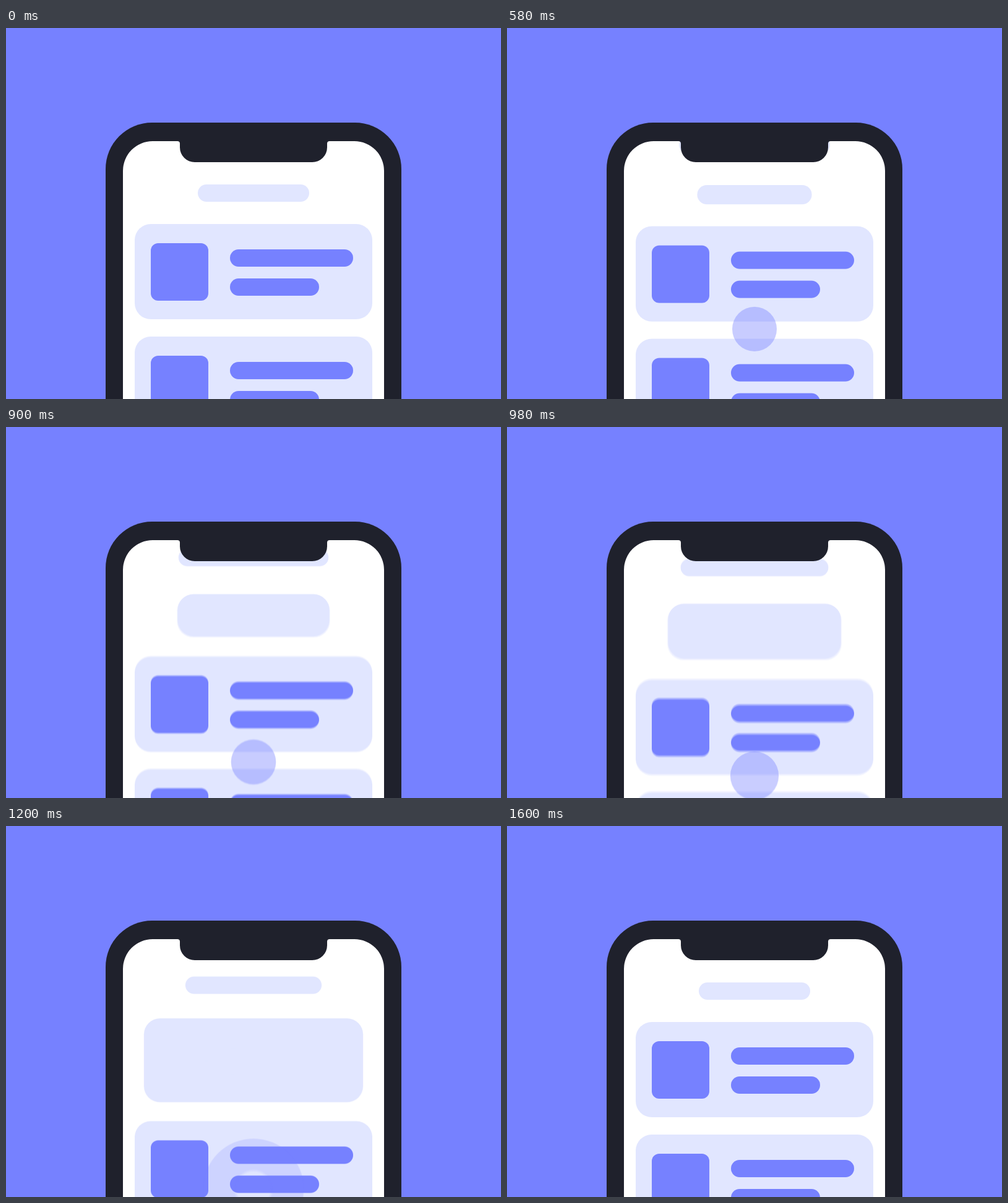
An HTML page with a canvas for the animation above (2400 ms loop, 800 by 600 pixels).

```html
<!DOCTYPE html>
<html lang="en">
<head>
<meta charset="utf-8">
<title>Pull to refresh</title>
<style>
  html, body { margin: 0; width: 100%; height: 100%; overflow: hidden; background: #7681ff; }
  canvas { display: block; }
</style>
</head>
<body>
<canvas id="stage" width="800" height="600"></canvas>
<script>
const W = 800, H = 600, LOOP = 2400, STEP = 20, SHUTTER = 10, SAMPLES = 6;
const BLUE = '#7681ff', PALE = '#e1e6ff', DARK = '#1f212c';
const MID = 400, CARD_W = 384, CARD_H = 154, PITCH = 182;

const out = document.getElementById('stage').getContext('2d');
const layer = document.createElement('canvas');
layer.width = W;
layer.height = H;
const g = layer.getContext('2d');

const mix = (a, b, k) => a + (b - a) * k;

// Cubic bezier easing with handles (x1, 0) and (x2, 1), run from start to end.
function tween(start, end, x1, x2) {
  return t => {
    const x = (t - start) / (end - start);
    if (x <= 0) return 0;
    if (x >= 1) return 1;
    let lo = 0, hi = 1, u = 0.5;
    for (let i = 0; i < 24; i++) {
      const v = 1 - u;
      if (3 * x1 * u * v * v + 3 * x2 * u * u * v + u * u * u < x) lo = u;
      else hi = u;
      u = (lo + hi) / 2;
    }
    return u * u * (3 - 2 * u);
  };
}

const shift = tween(400, 1600, 0.68, 0.274);
const growth = tween(400, 1600, 0.605, 0.36);
const shrink = tween(800, 1600, 0.44, 0.8);
const reveal = tween(260, 600, 0.4, 0.6);
const content = tween(1140, 1420, 0.68, 0.274);
const press = tween(240, 500, 0.5, 0.5);
const drag = tween(465, 1305, 0.63, 0.37);
const spread = tween(860, 1420, 0.63, 0.37);
const hollow = tween(1038, 1420, 0.63, 0.37);
const fade = tween(970, 1405, 1 / 3, 2 / 3);
const linear = (t, a, b) => Math.min(1, Math.max(0, (t - a) / (b - a)));

function box(x, y, w, h, r, color, alpha = 1) {
  if (w <= 0 || h <= 0 || alpha <= 0) return;
  g.globalAlpha = alpha;
  g.fillStyle = color;
  g.beginPath();
  g.roundRect(x, y, w, h, Math.min(r, w / 2, h / 2));
  g.fill();
  g.globalAlpha = 1;
}

// Card centred on cy; s scales the thumbnail and the lines.
function card(cy, w, h, s) {
  box(MID - w / 2, cy - h / 2, w, h, 26, PALE);
  const k = h / CARD_H, a = s * s;
  const size = 93 * s, line = 28 * s;
  box(327 - size, cy + 0.5 - size / 2, size, size, 12 * s, BLUE, a);
  box(362, cy - 22 * k - line / 2, 199 * s, line, line / 2, BLUE, a);
  box(362, cy + 25 * k - line / 2, 144 * s, line, line / 2, BLUE, a);
}

function touch(t) {
  if (t < 120 || t >= 1405) return;
  const on = mix(0.05, 1, press(t));
  const r = mix(mix(40, 36, press(t)), 96, spread(t));
  const hole = Math.min(r, 96 * hollow(t));
  const y = mix(485, 588.5, drag(t));
  g.globalAlpha = 0.4 * on * (1 - linear(t, 970, 1405));
  g.fillStyle = BLUE;
  g.beginPath();
  g.arc(MID, y, r, 0, Math.PI * 2);
  if (hole > 0) {
    g.moveTo(MID + hole, y);
    g.arc(MID, y, hole, 0, Math.PI * 2);
  }
  g.fill('evenodd');
  g.globalAlpha = 1;
}

function notch() {
  g.fillStyle = DARK;
  g.beginPath();
  g.moveTo(277, 182);
  g.lineTo(277, 183);
  g.arcTo(281, 183, 281, 187, 4);
  g.arcTo(281, 217, 305, 217, 24);
  g.arcTo(519, 217, 519, 193, 24);
  g.arcTo(519, 183, 523, 183, 4);
  g.lineTo(523, 182);
  g.fill();
}

function scene(t) {
  if (t >= 1600) t = 0;
  g.fillStyle = BLUE;
  g.fillRect(0, 0, W, H);
  box(161, 153, 478, 700, 75, DARK);

  g.save();
  g.beginPath();
  g.roundRect(189, 183, 422, 640, 48);
  g.fillStyle = '#fff';
  g.fill();
  g.clip();

  const q = shift(t), p = growth(t);
  const titleW = mix(244, 180, shrink(t));
  box(MID - titleW / 2, mix(173.3, 253, q), titleW, 28, 14, PALE, reveal(t));
  card(mix(267, 394, q), mix(180, CARD_W, p), mix(28, CARD_H, p), content(t));
  for (let i = 0; i < 2; i++) card(394 + PITCH * (i + q), CARD_W, CARD_H, 1);
  touch(t);
  g.restore();

  notch();
}

function render(t) {
  const n = t >= 400 && t < 1600 ? SAMPLES : 1;
  for (let i = 0; i < n; i++) {
    scene(n > 1 ? t + SHUTTER * ((i + 0.5) / n - 0.5) : t);
    out.globalAlpha = 1 / (i + 1);
    out.drawImage(layer, 0, 0);
  }
  out.globalAlpha = 1;
}

const begin = performance.now();
let last = -1;

function tick() {
  const now = Math.max(0, performance.now() - begin) % LOOP;
  const t = Math.floor(now / STEP) * STEP;
  if (t !== last) render(last = t);
  requestAnimationFrame(tick);
}
tick();
</script>
</body>
</html>
```
